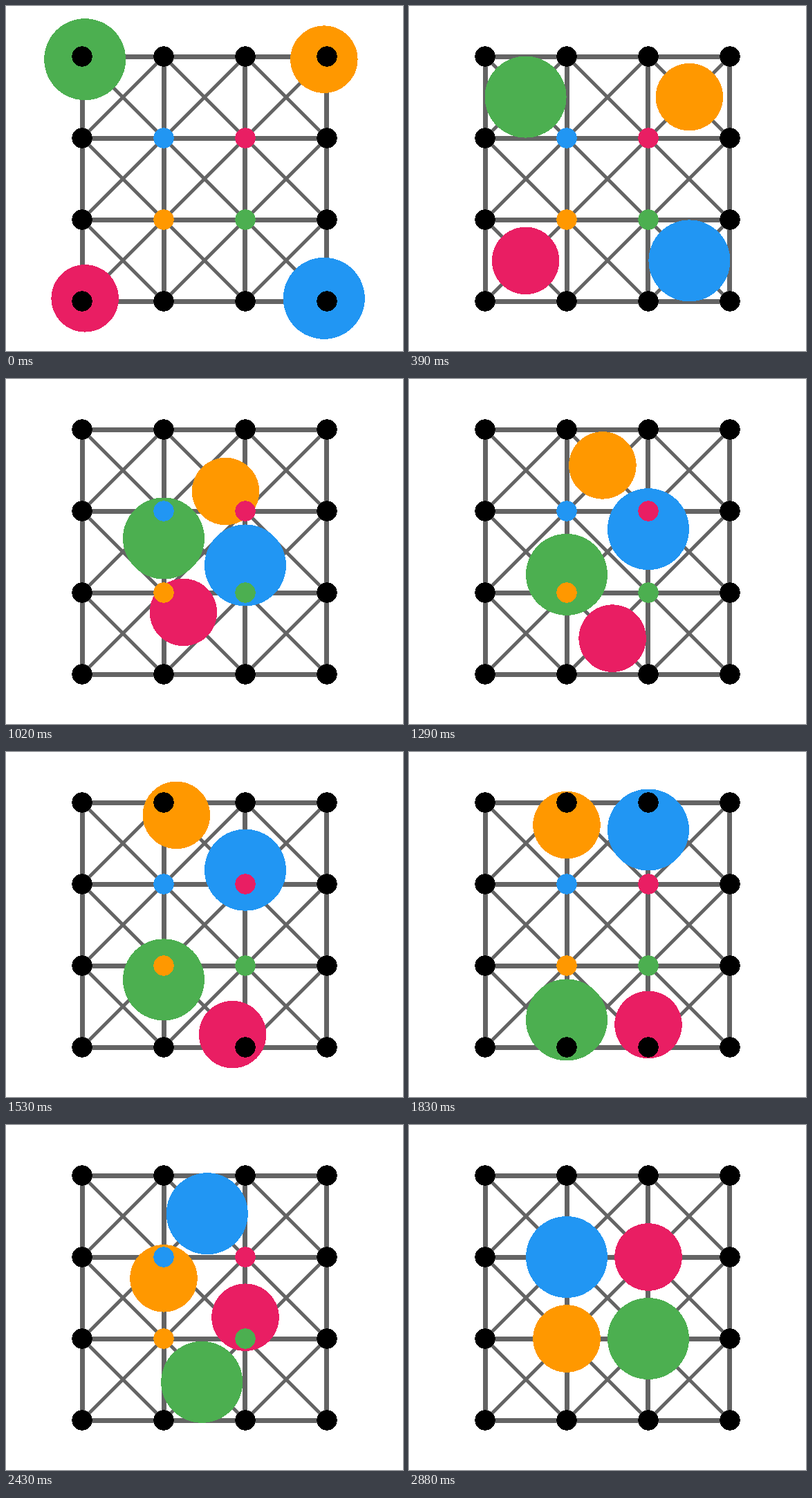
Animation, 574 px wide and 499 px high, one loop 2.91 s. Source, as an HTML page:

```html
<!DOCTYPE html>
<html lang="en">
<head>
<meta charset="utf-8">
<title>Discs moving on a grid</title>
<style>
  html, body { margin: 0; width: 100%; height: 100%; overflow: hidden; background: #fff; }
  svg { display: block; width: 574px; height: 499px; }
</style>
</head>
<body>
<svg id="stage" viewBox="0 0 574 499"></svg>
<script>
const STEP = 30, STEPS = 97;
const DIAGONAL = 28.2, STRAIGHT = STEPS - 2 * DIAGONAL; // steps per leg
const LAST = 3, CELL = 118;
const stage = document.getElementById('stage');

const gridX = i => 110 + CELL * i;
const gridY = j => 73 + CELL * j;

function add(name, attrs) {
  const el = document.createElementNS('http://www.w3.org/2000/svg', name);
  for (const key in attrs) el.setAttribute(key, attrs[key]);
  stage.appendChild(el);
  return el;
}

const line = (x1, y1, x2, y2, width) =>
  add('line', { x1, y1, x2, y2, stroke: '#646464', 'stroke-width': width });

const disc = (cx, cy, r, fill) =>
  add('circle', { cx, cy, r, fill, 'shape-rendering': 'crispEdges' });

function drawLines() {
  for (let i = 0; i <= LAST; i++) {
    // Half-pixel shifts keep the 7px bars on whole pixels.
    const x = gridX(i) + (i < LAST / 2 ? 0.5 : -0.5), y = gridY(i) + 0.5;
    line(gridX(0), y, gridX(LAST), y, 7);
    line(x, gridY(0), x, gridY(LAST), 7);
  }
  for (let i = 0; i < LAST; i++) {
    for (let j = 0; j < LAST; j++) {
      line(gridX(i), gridY(j), gridX(i + 1), gridY(j + 1), 5);
      line(gridX(i + 1), gridY(j), gridX(i), gridY(j + 1), 5);
    }
  }
}

// Routes run through grid nodes; opposite discs mirror each other through the centre.
const mirror = route => route.map(([i, j]) => [LAST - i, LAST - j]);
const bigRoute = [[0, 0], [1, 1], [1, 3], [2, 2]];
const smallRoute = [[3, 0], [2, 1], [1, 0], [1, 2]];
const movers = [
  { r: 59, fill: '#4caf50', route: bigRoute },
  { r: 59, fill: '#2196f3', route: mirror(bigRoute) },
  { r: 48.75, fill: '#ff9800', route: smallRoute },
  { r: 48.75, fill: '#e91e63', route: mirror(smallRoute) }
];

function nodeColor(i, j) {
  const visitor = movers.find(({ route }) => {
    const [endI, endJ] = route[route.length - 1];
    return endI === i && endJ === j;
  });
  return visitor ? visitor.fill : '#000';
}

function drawNodes() {
  for (let i = 0; i <= LAST; i++) {
    for (let j = 0; j <= LAST; j++) disc(gridX(i), gridY(j), 14.7, nodeColor(i, j));
  }
}

function pointAt(route, steps) {
  for (let n = 1; n < route.length; n++) {
    const [i0, j0] = route[n - 1], [i1, j1] = route[n];
    const duration = i0 === i1 ? STRAIGHT : DIAGONAL;
    if (steps <= duration || n === route.length - 1) {
      const k = Math.min(1, steps / duration);
      return [gridX(i0 + (i1 - i0) * k), gridY(j0 + (j1 - j0) * k)];
    }
    steps -= duration;
  }
}

function render(ms) {
  const steps = Math.floor(ms / STEP) % STEPS + 1;
  for (const { el, route } of movers) {
    const [x, y] = pointAt(route, steps);
    el.setAttribute('cx', x);
    el.setAttribute('cy', y);
  }
}

drawLines();
for (const m of movers) m.el = disc(0, 0, m.r, m.fill);
drawNodes();

const start = performance.now();
function tick() {
  render(performance.now() - start);
  requestAnimationFrame(tick);
}
tick();
</script>
</body>
</html>
```
